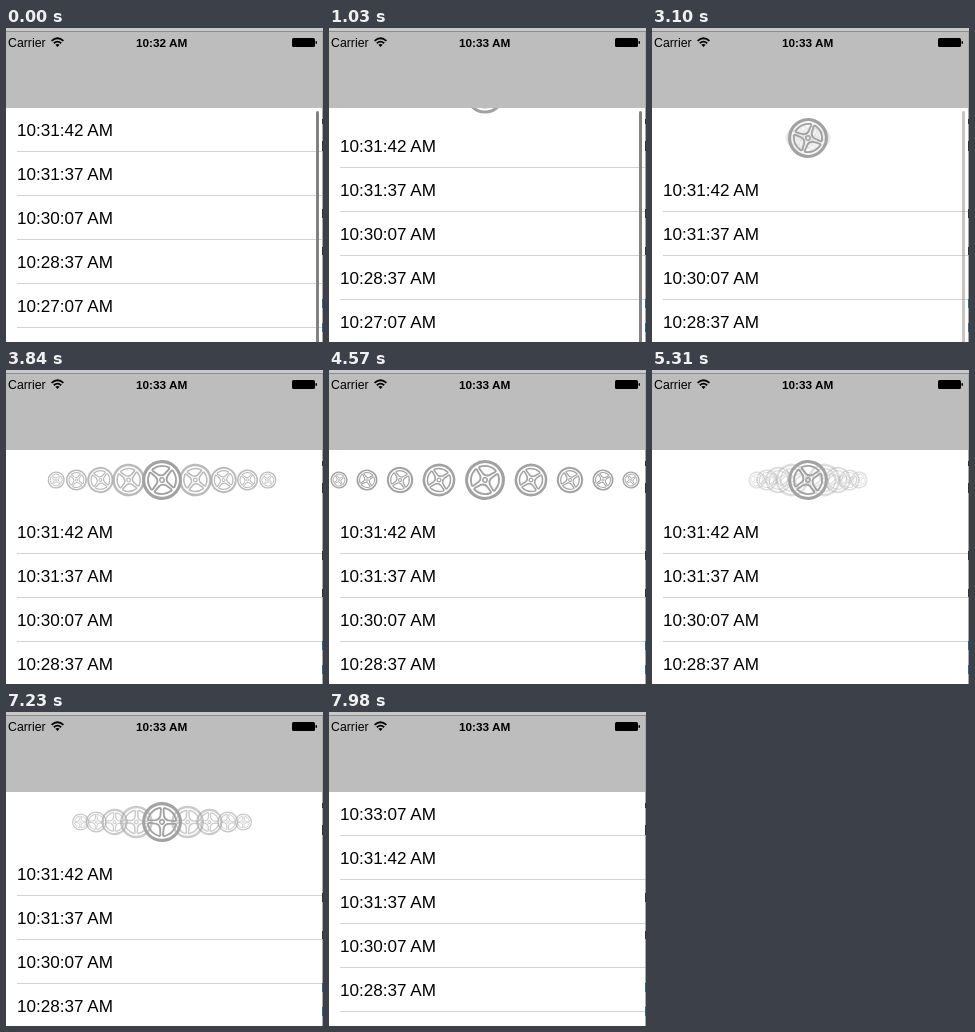
These frames come from a looping animation (317 by 314 pixels, 8.46 s). An HTML page:

```html
<!DOCTYPE html>
<html lang="en">
<head>
<meta charset="utf-8">
<title>Pull to refresh</title>
<style>
  html, body { margin: 0; width: 100%; height: 100%; overflow: hidden; background: #fff; }
  svg { display: block; width: 317px; height: 314px; font-family: "Liberation Sans", Arial, sans-serif; }
</style>
</head>
<body>
<svg viewBox="0 0 317 314">
  <defs>
    <g id="wheel" fill="none" stroke="#a2a2a2">
      <circle r="18.4" stroke-width="3.1"/>
      <g id="spokes"></g>
      <circle r="2.2" stroke-width="1.5"/>
    </g>
    <path id="pane" d="M-8 -11.8Q0 -16.4 8 -11.8Q9 -11 8.1 -10L3.2 -5.7Q0 -3.6 -3.2 -5.7L-8.1 -10Q-9 -11 -8 -11.8Z" stroke-width="1.9"/>
  </defs>

  <rect width="317" height="314" fill="#fff"/>
  <g id="wheels"></g>
  <g id="list" font-size="17.1"></g>
  <rect id="bar" x="310" y="83" width="3" height="234" rx="1.5" fill="#828282"/>

  <rect width="316" height="80" fill="#bdbdbd"/>
  <rect width="317" height="3" fill="#c9c9c9"/>
  <rect y="3" width="317" height="1" fill="#8c8c8c"/>
  <text x="2" y="19" font-size="12.3">Carrier</text>
  <g fill="none" stroke="#000" stroke-width="1.8">
    <path d="M45.6 12.9Q51.5 7.6 57.4 12.9M47.8 15.2Q51.5 12 55.2 15.2"/>
    <path d="M51.5 19L49.4 16.8Q51.5 15.2 53.6 16.8Z" fill="#000" stroke="none"/>
  </g>
  <text id="clock" x="130" y="19" font-size="11.8" font-weight="bold"></text>
  <rect x="286" y="10" width="23" height="9" rx="1.5"/>
  <rect x="309.5" y="13" width="1.5" height="3" rx=".7"/>

  <rect x="316" y="4" width="1" height="310" fill="#a9a9a9"/>
  <g fill="#333">
    <rect x="316" y="91" width="1" height="5"/>
    <rect x="316" y="113" width="1" height="10"/>
    <rect x="316" y="181" width="1" height="9"/>
    <rect x="316" y="219" width="1" height="8"/>
  </g>
  <path d="M316.5 271v9M316.5 295v9" stroke="#2a66a0"/>
</svg>
<script>
const LOOP = 8460, RELOAD = 7640, ROW = 44;
const CENTER = 156, REST = 60, PULL = 82;
const OLD = ["10:31:42", "10:31:37", "10:30:07", "10:28:37", "10:27:07", "10:25:37"];
const NEW = ["10:33:07", ...OLD.slice(0, 5)];
const SIDES = [[46, .82], [85, .66], [118, .53], [146, .43]];
// Stepped stretches: start, end, number of steps
const STEPS = [[880, 1770, 6], [2660, 3100, 3], [3100, 4570, 10],
  [4570, 5910, 9], [5910, 7230, 9], [7230, 7980, 5]];

const $ = id => document.getElementById(id);
const clamp = x => Math.min(1, Math.max(0, x));
const easeOut = x => 1 - (1 - clamp(x)) ** 3;
const easeBoth = x => (1 - Math.cos(Math.PI * clamp(x))) / 2;

function add(parent, tag, attrs) {
  const el = document.createElementNS("http://www.w3.org/2000/svg", tag);
  for (const k in attrs) el.setAttribute(k, attrs[k]);
  return parent.appendChild(el);
}

for (let a = 0; a < 360; a += 90)
  add($("spokes"), "use", { href: "#pane", transform: `rotate(${a})` });

const rows = OLD.map((_, i) => {
  const top = 80 + i * ROW;
  add($("list"), "rect", { x: 11, y: top + 43, width: 305, height: 1, fill: "#d2d2d4" });
  return add($("list"), "text", { x: 11, y: top + 28 });
});

const wheels = [[0, 1], ...SIDES, ...SIDES.map(([x, s]) => [-x, s])]
  .map(([x, scale]) => ({ x, scale, el: add($("wheels"), "use", { href: "#wheel" }) }))
  .reverse();
$("wheels").append(...wheels.map(w => w.el));

function stepped(t) {
  for (const [from, to, n] of STEPS) {
    if (t >= from && t < to) {
      const d = (to - from) / n;
      return from + Math.floor((t - from) / d) * d;
    }
  }
  return t;
}

function listOffset(t) {
  if (t < 880) return 0;
  if (t < 2600) return PULL * easeBoth((t - 730) / 1040);
  if (t < RELOAD) return PULL + (REST - PULL) * easeOut((t - 2600) / 400);
  return REST * (1 - easeBoth((t - RELOAD) / 320));
}

// Wheels fly out and fall back once per second
function spreadAt(t) {
  const p = (t - 3075) / 997;
  return p < 0 ? 0 : 1 - (2 * (p % 1) - 1) ** 2;
}

function barOpacity(t) {
  if (t < 140) return 1;
  return t < 880 ? 0 : clamp((3220 - t) / 260);
}

function draw(time) {
  const t = stepped(time);
  const y = listOffset(t);
  const spread = spreadAt(t);
  const angle = .148 * Math.max(0, t - 2660);
  const times = t < RELOAD ? OLD : NEW;

  $("list").setAttribute("transform", `translate(0 ${Math.round(y)})`);
  rows.forEach((row, i) => row.textContent = times[i] + " AM");
  $("clock").textContent = (t < 590 ? "10:32" : "10:33") + " AM";
  $("bar").setAttribute("opacity", barOpacity(t));

  for (const { x, scale, el } of wheels) {
    el.setAttribute("transform",
      `translate(${CENTER + x * spread} ${50 + y}) rotate(${angle}) scale(${scale})`);
    el.setAttribute("opacity", x ? spread : 1);
  }
}

function frame() {
  draw(performance.now() % LOOP);
  requestAnimationFrame(frame);
}
frame();
</script>
</body>
</html>
```
